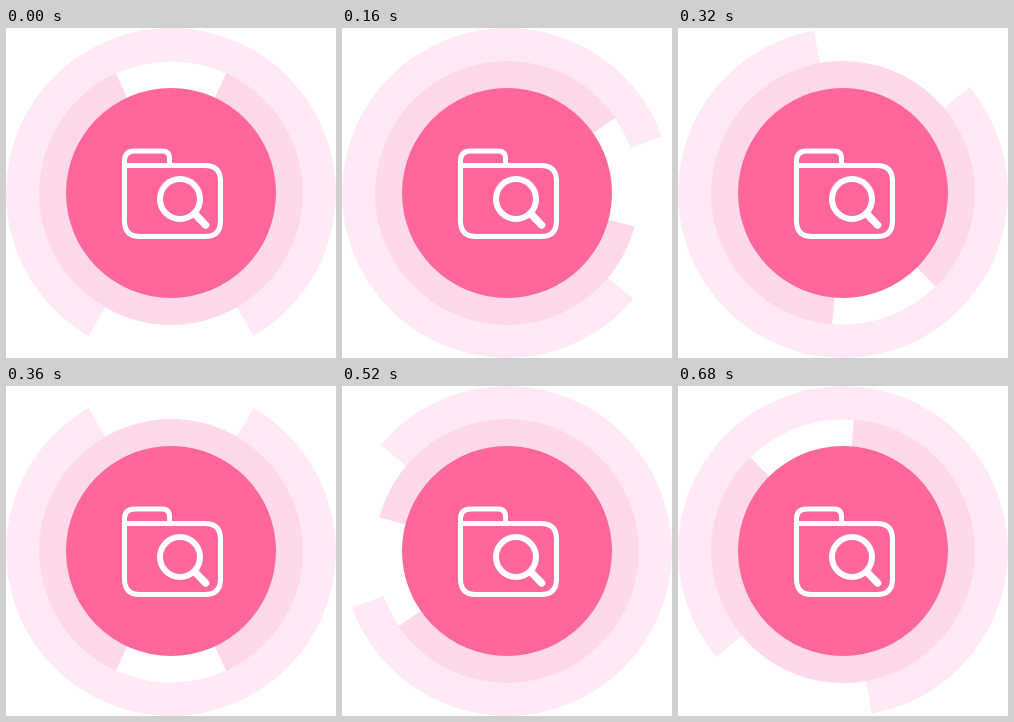
Recreate the animation shown at these times as an HTML page with a canvas. Size 330 by 330 pixels, loop 720 ms.

```html
<!DOCTYPE html>
<html lang="en">
<head>
<meta charset="utf-8">
<title>Folder search loader</title>
<style>
html, body { margin: 0; width: 100%; height: 100%; overflow: hidden; background: #fff; }
canvas { display: block; width: 330px; height: 330px; }
</style>
</head>
<body>
<canvas id="stage" width="330" height="330"></canvas>
<script>
const ctx = document.getElementById('stage').getContext('2d');
const CENTER = 165;
const LOOP = 720, STEP = 40, TURN = 20;
const rad = deg => deg * Math.PI / 180;

// Ring segment that leaves a gap of 2 * halfGap degrees around gapAngle.
function ring(outer, inner, gapAngle, halfGap, color) {
  const from = rad(gapAngle + halfGap);
  const to = rad(gapAngle - halfGap + 360);
  ctx.beginPath();
  ctx.arc(CENTER, CENTER, outer, from, to);
  ctx.arc(CENTER, CENTER, inner, to, from, true);
  ctx.closePath();
  ctx.fillStyle = color;
  ctx.fill();
}

function disc() {
  ctx.beginPath();
  ctx.arc(CENTER, CENTER, 105, 0, 2 * Math.PI);
  ctx.fillStyle = '#ff6699';
  ctx.fill();
}

function strokePath(data, width) {
  ctx.lineWidth = width;
  ctx.stroke(new Path2D(data));
}

function icon() {
  ctx.strokeStyle = '#fff';
  ctx.lineCap = ctx.lineJoin = 'round';
  // folder body, tab, lens, handle
  strokePath('M118.5 137.5H199Q214.5 137.5 214.5 153V193Q214.5 208.5 199 208.5H134Q118.5 208.5 118.5 193Z', 5);
  strokePath('M118.5 137.5V133Q118.5 123 128.5 123H156Q163.5 123 163.5 130V137', 5);
  strokePath('M194 171A20 20 0 1 1 154 171A20 20 0 1 1 194 171Z', 6);
  strokePath('M189 186L199.5 197', 7.5);
}

function draw(now) {
  const angle = Math.floor((now % LOOP) / STEP) * TURN;
  ctx.fillStyle = '#fff';
  ctx.fillRect(0, 0, 330, 330);
  ring(165, 131.5, 90 - angle, 30, '#ffe9f4');
  ring(132, 100, -90 + angle, 24.7, '#ffd9ea');
  disc();
  icon();
}

let start;
function tick(now) {
  start ??= now;
  draw(now - start);
  requestAnimationFrame(tick);
}
draw(0);
requestAnimationFrame(tick);
</script>
</body>
</html>
```
